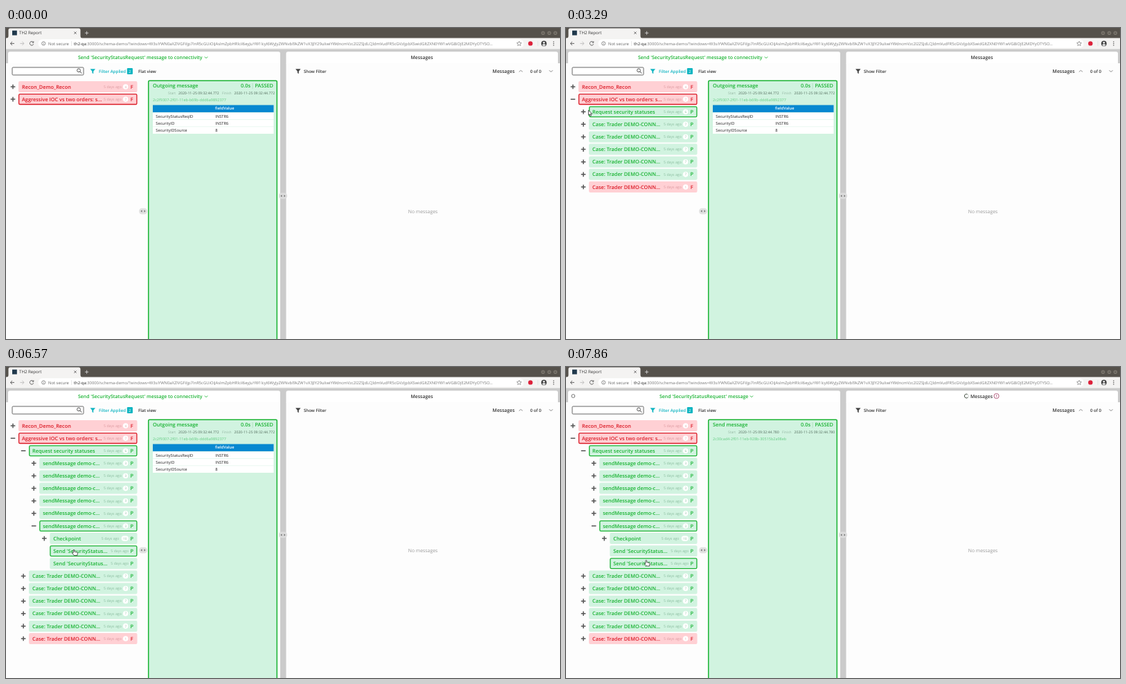
An HTML page for the animation above (8 s loop, 800 px wide and 450 px high).

```html
<!DOCTYPE html>
<html lang="en">
<head>
<meta charset="utf-8">
<title>TH2 Report</title>
<style>
  html, body { margin: 0; width: 100%; height: 100%; overflow: hidden; background: #ccc; }
  svg { display: block; width: 800px; height: 450px; }
  text { font-family: "Open Sans", "Noto Sans", sans-serif; text-rendering: geometricPrecision; white-space: pre; }
</style>
</head>
<body>
<svg id="stage" viewBox="0 0 800 450" xmlns="http://www.w3.org/2000/svg">
  <g id="base"></g>
  <g id="view"></g>
  <g id="pointer"></g>
</svg>
<script>
const LOOP = 8000, STEP = 1000 / 7;
const GREEN = '#19b332', MINT = '#d1f3e0', RED = '#db1a26', PINK = '#ffd0d4';
const TEAL = '#12b5c2', DARK = '#333', SEMI = 600;

// Moments at which the page changes
const OPEN_CASE = 2140, OPEN_REQUEST = 3570, OPEN_SEND = 5570;
const PICK = 7140, LOADED = 7710, HEADERS = 7860;

const $ = id => document.getElementById(id);
const rect = (x, y, w, h, fill, more = '') =>
  `<rect x="${x}" y="${y}" width="${w}" height="${h}" fill="${fill}" ${more}/>`;
const circle = (x, y, r, fill, more = '') =>
  `<circle cx="${x}" cy="${y}" r="${r}" fill="${fill}" ${more}/>`;
const line = (d, color, width = 1, more = '') =>
  `<path d="${d}" fill="none" stroke="${color}" stroke-width="${width}" ${more}/>`;
const text = (x, y, str, size, fill = DARK, weight = 400, anchor = 'start') =>
  `<text x="${x}" y="${y}" font-size="${size}" fill="${fill}" font-weight="${weight}" text-anchor="${anchor}">${str}</text>`;
const funnel = (x, y, fill) =>
  `<path d="M${x - 3.7} ${y - 3.3}h7.4l-2.8 3.4v3.6l-1.8 -1.2v-2.4z" fill="${fill}"/>`;
const chevron = (x, y, dir, color = '#777', w = 2.6) =>
  line(`M${x - w} ${y - dir}l${w} ${2 * dir}l${w} ${-2 * dir}`, color, 0.8);
const arrows = (x, y) =>
  `<path d="M${x - 1.4} ${y - 1.7}v3.4l-2.2 -1.7zM${x + 1.4} ${y - 1.7}v3.4l2.2 -1.7z" fill="#777"/>`;

function browser() {
  const url = '?windows=W3siYWN0aXZlVGFiIjp7InR5cGUiOiJAsImZpbHRlciI6eyJuYW1lcyI6WyJyZWNvbl9kZW1vX3JlY29u' +
    'IiwiYWdncmVzc2l2ZSJdLCJldmVudFR5cGVzIjpbXSwidGltZXN0YW1wVG8iOjE2MDYyOTYSO...';
  let s = rect(0, 0, 800, 15, '#55514b') +
    '<path d="M1 15Q3.5 14.5 3.5 12V3Q3.5 0.5 6 0.5H105Q107.5 0.5 107.5 3V12Q107.5 14.5 110 15z" fill="#f4f3f2"/>' +
    rect(9, 3.7, 6.8, 6.8, '#20384c') +
    text(19, 9.4, 'TH2 Report', 6.15) +
    line('M98.3 5.4l3.4 3.4m0 -3.4l-3.4 3.4', '#555', 0.8) +
    line('M114 7.2h5.2m-2.6 -2.6v5.2', '#ddd', 0.8);
  for (const x of [775.5, 784.5, 793.3]) s += circle(x, 7.3, 2.8, '#77726a') + rect(x - 1, 6.9, 2, 0.8, '#3c3935');
  s += rect(0, 14.5, 800, 16, '#f4f3f2') +
    rect(46.5, 16.2, 701, 12.6, '#fff', 'rx="6.3"') +
    line('M12 22.4h-5.6m2.6 -2.6l-2.6 2.6l2.6 2.6', '#555', 0.9) +
    line('M20.4 22.4h5.6m-2.6 -2.6l2.6 2.6l-2.6 2.6', '#bbb', 0.9) +
    line('M39.4 20.6a2.8 2.8 0 1 0 .4 2.6M39.8 19.2v2h-2.2', '#555', 0.9) +
    circle(54.2, 22.4, 2.6, 'none', 'stroke="#666" stroke-width=".7"') +
    line('M54.2 22.1v1.7m0 -3.1v.7', '#666', 0.7) +
    text(61, 24.6, 'Not secure', 5.9, '#666') +
    line('M94.6 19v7', '#ccc', 0.5) +
    text(98, 24.6, `<tspan fill="#222">th2-qa</tspan>:30000/schema-demo/${url}`, 5.85, '#777') +
    rect(730.5, 18, 16, 9, '#fff') +
    line('M741 19.2l1 2.2l2.4 .2l-1.8 1.6l.5 2.4l-2.1 -1.3l-2.1 1.3l.5 -2.4l-1.8 -1.6l2.4 -.2z', '#666', 0.6) +
    circle(757.3, 22.4, 3.2, '#dc1f38') +
    line('M768 19v7', '#ccc', 0.5) +
    circle(776.8, 22.4, 3.9, '#444') + circle(776.8, 21.2, 1.3, '#fff') +
    '<path d="M774.2 24.6q2.6 -2.6 5.2 0q-2.6 2.4 -5.2 0z" fill="#fff"/>';
  for (const y of [19.9, 22.4, 24.9]) s += circle(790.8, y, 0.75, '#555');
  return s;
}

function page() {
  const top = (x, w) => `<path d="M${x} 51.5V37q0 -2.8 2.8 -2.8h${w - 5.6}q2.8 0 2.8 2.8v14.5z" fill="#fff"/>`;
  return rect(0, 30.5, 800, 420, '#cbcbcb') +
    top(3, 393) + top(404.5, 392.5) +
    rect(0, 51, 396, 399, '#fdfdfd') + rect(404.5, 51, 396, 399, '#fdfdfd') +
    rect(9, 57, 103, 11, '#fff', 'rx="1.2" stroke="#555" stroke-width=".9"') +
    circle(105, 61.3, 2.4, 'none', 'stroke="#333" stroke-width=".8"') +
    line('M106.8 63.1l2.5 2.5', DARK, 1) +
    funnel(125.3, 62.6, TEAL) +
    text(134, 64.8, 'Filter Applied', 6.1, TEAL, SEMI) +
    rect(174.8, 58, 8.2, 9, TEAL, 'rx="1.2"') +
    text(178.9, 64.5, '2', 5.4, '#fff', 400, 'middle') +
    text(191, 64.8, 'Flat view', 6.1, DARK, SEMI) +
    funnel(421.8, 62.6, '#444') +
    text(430, 64.8, 'Show Filter', 6.1, DARK, SEMI) +
    text(702.6, 64.9, 'Messages', 6.85, DARK, SEMI) +
    chevron(743.4, 62.4, -1) +
    text(757, 64.8, '0 of 0', 6.1, DARK, SEMI) +
    chevron(787, 62.4, 1) +
    text(602, 267.6, 'No messages', 6.85, '#999', 400, 'middle') +
    rect(192, 260.8, 12, 8.6, '#e2e2e2', 'rx="4.3"') + arrows(198, 265) +
    rect(394, 238.6, 12, 8.6, '#dcdcdc', 'rx="4.3"') + arrows(400, 243);
}

// Each row: depth, label, count, passed, outlined, state ('+', '-' or none)
function rowsAt(t) {
  const cases = t >= OPEN_CASE, request = t >= OPEN_REQUEST, send = t >= OPEN_SEND, picked = t >= PICK;
  const rows = [
    [0, 'Recon_Demo_Recon', 4, false, false, '+'],
    [0, 'Aggressive IOC vs two orders: s...', 7, false, true, cases ? '-' : '+']
  ];
  if (!cases) return rows;
  rows.push([1, 'Request security statuses', 6, true, true, request ? '-' : '+']);
  if (request) {
    for (let i = 0; i < 6; i++)
      rows.push([2, 'sendMessage demo-c...', 3, true, i === 5, i === 5 && send ? '-' : '+']);
    if (send) rows.push(
      [3, 'Checkpoint', 10, true, false, '+'],
      [3, "Send 'SecurityStatus...", 0, true, !picked, ''],
      [3, "Send 'SecurityStatus...", 0, true, picked, '']);
  }
  for (let i = 0; i < 6; i++)
    rows.push([1, 'Case: Trader DEMO-CONN...', i < 5 ? 7 : 1, i < 5, false, '+']);
  return rows;
}

function drawRow([depth, label, count, passed, outlined, state], i) {
  const x = 18 + depth * 15.1, y = 85 + i * 18.12, px = x - 8;
  const color = passed ? GREEN : RED, soft = passed ? '#8bbd9f' : '#dc9aa0';
  let s = outlined
    ? rect(x + 0.6, y - 7.4, 170.3 - depth * 15.1, 14.8, passed ? MINT : PINK, `rx="1.6" stroke="${color}" stroke-width="1.3"`)
    : rect(x, y - 8, 171.5 - depth * 15.1, 16, passed ? MINT : PINK, 'rx="2"');
  if (state) s += line(`M${px - 3.3} ${y}h6.6` + (state === '+' ? 'm-3.3 -3.3v6.6' : ''), '#555', 1.5);
  s += text(x + 5, y + 2.6, label, 7.35, color, SEMI);
  const wide = count > 9;
  s += text(count ? (wide ? 163.5 : 166.8) : 177, y + 1.8, '5 days ago', 5.2, soft, 400, 'end');
  if (count) {
    const w = wide ? 10.4 : 7.6;
    s += rect((wide ? 171.8 : 172.7) - w / 2, y - 3.8, w, 7.6, '#fff', 'rx="3.8"') +
      text(wide ? 171.8 : 172.7, y + 1.6, count, 4.6, soft, 400, 'middle');
  }
  return s + text(181.8, y + 2.6, passed ? 'P' : 'F', 7.35, color, SEMI, 'middle');
}

function panel(loaded) {
  const day = '2020-11-25 09:32:44.' + (loaded ? '780' : '772');
  const hash = loaded ? '2c30cad4-2f01-11eb-928b-30515b2a98eb' : '2c2f9307-2f01-11eb-b69b-ddd6a9892377';
  let s = rect(205.7, 76.2, 185.6, 380, MINT, `rx="1.5" stroke="${GREEN}" stroke-width="1.5"`) +
    text(212, 86.4, loaded ? 'Send message' : 'Outgoing message', 7.35, GREEN, SEMI) +
    text(339, 86.4, '0.0s', 7.35, GREEN, SEMI) +
    line('M356 80v8', '#9ed8ae', 0.6) +
    text(386, 86.4, 'PASSED', 7.35, GREEN, SEMI, 'end') +
    text(234, 95.8, 'Start', 5, '#93b5a1') + text(249, 95.8, day, 5.15, '#526b5c') +
    text(312, 95.8, 'Finish', 5, '#93b5a1') + text(329.5, 95.8, day, 5.15, '#526b5c') +
    text(212, 106.4, hash, 5.5, '#62cc80');
  if (loaded) return s;
  s += rect(212, 111.5, 174.5, 10.4, '#0788d0') + text(302, 118.4, 'fieldValue', 5.75, '#fff', SEMI);
  [['SecurityStatusReqID', 'INSTR6'], ['SecurityID', 'INSTR6'], ['SecurityIDSource', '8']].forEach(([key, value], i) => {
    const y = 122.4 + i * 10.35;
    s += rect(212, y, 174.5, 9.9, '#fff') +
      text(216.3, y + 7.1, key, 5.72, '#222') + text(302.3, y + 7.1, value, 5.72, '#222');
  });
  return s;
}

function spinner(x, y, r, width, turn) {
  const dash = 2 * Math.PI * r;
  return circle(x, y, r, 'none', `stroke="#c9d2c9" stroke-width="${width}"`) +
    circle(x, y, r, 'none', `stroke="#4d564b" stroke-width="${width}" stroke-dasharray="${dash * 0.68} ${dash}" transform="rotate(${turn} ${x} ${y})"`);
}

function headers(t) {
  const busy = t >= PICK, noted = t >= HEADERS, turn = (t - 7570) * 0.36 - 60;
  const x = busy ? (noted ? 135 : 130) : 104;
  let s = text(x, 44.6, "Send 'SecurityStatusRequest' message" + (busy ? '' : ' to connectivity'), 6.95, GREEN, SEMI) +
    chevron(busy ? x + 133 : 289, 42.6, 1, GREEN, 2.3) +
    text(busy ? (noted ? 584 : 589) : 584.5, 44.6, 'Messages', 6.85, DARK, SEMI);
  if (busy) s += spinner(noted ? 578.3 : 583.6, 42, 2.9, 0.9, turn);
  if (noted) s += circle(10.4, 42, 2.4, 'none', 'stroke="#555" stroke-width=".8"') +
    circle(621.6, 42, 3.6, 'none', 'stroke="#a23a63" stroke-width=".8"') +
    line('M621.6 40.2v2.2m0 .7v.8', '#a23a63', 0.8);
  return s;
}

function scene(t) {
  let s = headers(t) + rowsAt(t).map(drawRow).join('');
  if (t < PICK || t >= LOADED) s += panel(t >= LOADED);
  else s += spinner(298.2, 265, 7.6, 2, (t - 7570) * 0.36 + 40) +
    rect(0, 444.3, 266.5, 8, '#ececec', 'rx="1.5"') + text(2, 451.6, 'Waiting for th2-qa...', 5.85, '#555');
  return s;
}

// Pointer stops: time, x, y
const STOPS = [
  [570, 215, 181], [1430, 5, 100], [2290, 7, 101], [3290, 32.4, 119], [3500, 25, 120],
  [3900, 26, 122], [4430, 73.6, 188.6], [4900, 62, 224], [5290, 40, 228],
  [5850, 42, 230], [6290, 88, 258], [6430, 98, 264], [6570, 98, 264],
  [7000, 115.8, 279.3], [8000, 115.8, 279.3]
];

function pointer(t) {
  if (t < STOPS[0][0]) return '';
  const i = STOPS.findIndex(stop => stop[0] > t);
  const [t0, x0, y0] = STOPS[i - 1], [t1, x1, y1] = STOPS[i];
  const p = (t - t0) / (t1 - t0), e = p * p * (3 - 2 * p);
  const x = x0 + (x1 - x0) * e, y = y0 + (y1 - y0) * e;
  const hand = t >= 6000 || (x > 48 && t >= 3900 && t < 5290);
  const shape = hand
    ? 'M-.9 .9q.9 -1.5 1.8 0v2.4l3.7 .8q1 .3 .8 1.5l-.6 3.1h-4.3l-2.8 -3.2q-.2 -1.2 1.4 -.5z'
    : 'M0 0v7.2l1.7 -1.5l1.2 2.7l1.3 -.6l-1.2 -2.6h2.3z';
  return `<path transform="translate(${x} ${y})" d="${shape}" fill="#fff" stroke="#222" stroke-width=".75" stroke-linejoin="round"/>`;
}

$('base').innerHTML = page() + browser();
const start = performance.now();
let shown = -1;
function tick(now) {
  const time = Math.max(0, now - start) % LOOP;
  const step = Math.floor((time + 4) / STEP);
  if (step !== shown) {
    shown = step;
    const t = Math.min(step * STEP + 4, LOOP - 1);
    $('view').innerHTML = scene(t);
    $('pointer').innerHTML = pointer(t);
  }
  requestAnimationFrame(tick);
}
tick(start);
</script>
</body>
</html>
```
